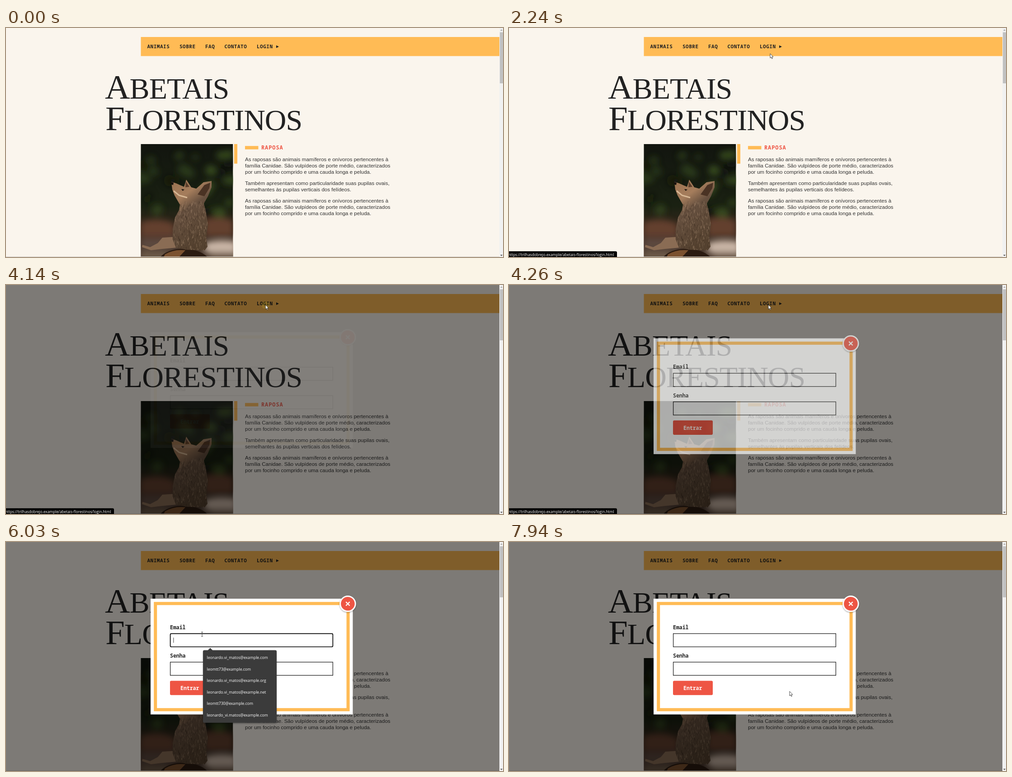
Animation of 1100 by 509 pixels, one loop 8 s. Source, as an HTML page:

```html
<!DOCTYPE html>
<html lang="pt">
<head>
<meta charset="utf-8">
<title>Abetais Florestinos</title>
<style>
html, body { margin: 0; width: 100%; height: 100%; overflow: hidden; background: #faf5ed; }
svg { display: block; width: 100vw; height: 100vh; }
text { white-space: pre; }
.title { font: 66px "Liberation Serif", serif; letter-spacing: -1px; fill: #222; }
.title .cap { font-size: 77px; }
.mono { font: 600 11.5px "Noto Sans Mono", monospace; fill: #222; }
.nav { font-size: 11px; letter-spacing: .52px; }
.body { font: 11.55px "Liberation Sans", sans-serif; fill: #333; }
.ui { font: 8.6px "Open Sans", sans-serif; fill: #fff; }
.field { fill: #fff; stroke: #222; stroke-width: 1.3; }
.arrow, .hand { fill: #fff; stroke: #222; stroke-width: .8; stroke-linejoin: round; }
</style>
</head>
<body>
<svg viewBox="0 0 1100 509">
  <defs>
    <clipPath id="photoClip"><rect x="298.5" y="258" width="203.7" height="251"/></clipPath>
    <clipPath id="foxClip"><use href="#foxBody"/></clipPath>
    <filter id="soft" x="-50%" y="-50%" width="200%" height="200%"><feGaussianBlur stdDeviation="7"/></filter>
    <filter id="shadow" x="-30%" y="-30%" width="160%" height="160%">
      <feDropShadow dx="0" dy="1.5" stdDeviation="1.5" flood-opacity=".35"/>
    </filter>
    <linearGradient id="woods" x2="0" y2="1">
      <stop offset="0" stop-color="#12150f"/><stop offset=".55" stop-color="#1a2112"/>
      <stop offset=".72" stop-color="#33271c"/><stop offset="1" stop-color="#4d3b30"/>
    </linearGradient>
    <linearGradient id="fur" x2=".4" y2="1">
      <stop offset="0" stop-color="#9a7150"/><stop offset=".3" stop-color="#a57d5c"/>
      <stop offset=".5" stop-color="#66503f"/><stop offset="1" stop-color="#54412f"/>
    </linearGradient>
  </defs>

  <rect width="1100" height="509" fill="#faf5ed"/>
  <rect x="298.5" y="20" width="793.5" height="42.4" fill="#fb5"/>
  <g id="nav"></g>
  <path d="M598 38.6l6 2.9-6 2.9z" fill="#222"/>
  <text class="title" x="219" y="157"><tspan class="cap">A</tspan>BETAIS</text>
  <text class="title" x="220" y="227"><tspan class="cap">F</tspan>LORESTINOS</text>

  <g clip-path="url(#photoClip)">
    <rect x="298" y="258" width="205" height="251" fill="url(#woods)"/>
    <g filter="url(#soft)">
      <g id="leaves"></g>
      <path d="M298 432q40-14 75 4v28h-75zM440 425q30-8 62 2v36h-62z" fill="#63402d"/>
      <path d="M298 468h80v24h-80z" fill="#5d4a40"/>
      <path d="M440 478q30-10 70-3v24h-70z" fill="#c9b5a6"/>
      <path d="M298 498h60v14h-60zM452 500h60v12h-60z" fill="#75624f"/>
    </g>
    <path d="M340 511q14-18 46-20 40-2 62 20z" fill="#2b1b11"/>
    <path d="M352 503q20-12 45-9l-14 15h-34z" fill="#7b512f"/>
    <path d="M376 464L346 466 336 478 319 487 302 482 301 487 321 494 346 491 379 488z" fill="#8a6c54"/>
    <path id="foxBody" fill="url(#fur)" d="M366 342L376 345 394 353 399 337 410 354 421 357 437 343 455 340 455 354 447 374 438 390 443 411 447 438 443 465 446 486 440 494 400 493 376 488 369 470 369 447 374 421 383 405 385 393 373 372 368 359z"/>
    <g id="furStrokes" clip-path="url(#foxClip)"></g>
    <path d="M424 370L439 349 452 344 450 356 439 374z" fill="#4a3324"/>
    <path d="M398 341l8 12-9 1z" fill="#5a3d2a"/>
    <path d="M365 342l6 2-1 5-4-1zM388 358l7 1-4 3z" fill="#15100d"/>
    <path d="M371 362l12 10 18 5" fill="none" stroke="#d8b895" stroke-width="3"/>
  </g>

  <path d="M505 258h7v43.5h-7zM529 262.3h29.5v7.5H529z" fill="#fb5"/>
  <text class="mono" x="565" y="270" style="font-size:12px;letter-spacing:.9px;fill:#e54">RAPOSA</text>
  <g id="copy"></g>
  <rect y="508" width="1092" height="1" fill="#cfcac3"/>

  <g id="modal">
    <rect width="1092" height="509" opacity=".5"/>
    <g id="dialog">
      <rect x="320" y="126" width="447.5" height="257.3" fill="#fff"/>
      <rect x="330.7" y="136.7" width="426.4" height="236" fill="#fff" stroke="#fb5" stroke-width="7"/>
      <text class="mono" x="363" y="193.5">Email</text>
      <rect id="email" class="field" x="363.6" y="203.6" width="359.8" height="29.4"/>
      <text class="mono" x="363" y="257.2">Senha</text>
      <rect id="password" class="field" x="363.6" y="267" width="359.8" height="29.4"/>
      <rect x="363" y="308.5" width="88" height="31.8" rx="2.8" fill="#e54"/>
      <text class="mono" x="386" y="329" style="font-weight:700;fill:#fff">Entrar</text>
      <g filter="url(#shadow)"><circle cx="756.5" cy="137.3" r="18.2" fill="#fff"/></g>
      <circle cx="756.5" cy="137.3" r="15.3" fill="#e54"/>
      <path d="M752.3 133.1l8.4 8.4m0-8.4l-8.4 8.4" stroke="#fff" stroke-width="2.3"/>
    </g>
    <rect id="caret" x="370.4" width=".9" height="11.5" fill="#222"/>
    <g id="suggestions" filter="url(#shadow)">
      <path d="M446.5 241l5.5-5.5 5.5 5.5z" fill="#3b3b3b"/>
      <rect x="436" y="240.4" width="163" height="161.4" rx="3" fill="#3b3b3b"/>
    </g>
  </g>

  <g id="status">
    <path d="M0 496.3h236q3 0 3 3V509H0z"/>
    <text class="ui" x="-2" y="507" style="font-size:8.3px">https://trilhasdobrejo.example/abetais-florestinos/login.html</text>
  </g>

  <rect x="1092" width="8" height="509" fill="#f1f1f1"/>
  <rect x="1093" y="9.5" width="7" height="113.5" fill="#c1c1c1"/>
  <path d="M1094 6l2.5-3 2.5 3z" fill="#a3a3a3"/>
  <path d="M1094 504l2.5 3 2.5-3z" fill="#505050"/>

  <g id="cursor">
    <circle id="ring" cy="1" r="8.5" fill="#fe1" fill-opacity=".75"/>
    <path id="arrow" class="arrow" d="M0 0V9.8L2.2 7.8 3.8 11.3 5.4 10.6 3.9 7.1H6.8z"/>
    <path id="hand" class="hand" d="M-1.1 1Q0-.6 1.1 1V5L5 6Q6 6.5 6 8V11L4.5 14.6H-.5L-3.5 9.5Q-3.5 8-2.2 8.4L-1.1 9.5z"/>
    <path id="beam" d="M-2-5H-.6L0-4.5.6-5H2M-2 5H-.6L0 4.5.6 5H2M0-4.5V4.5" fill="none" stroke="#333" stroke-width=".9"/>
  </g>
</svg>
<script>
const LOOP = 8000;
const $ = id => document.getElementById(id);
const clamp = v => Math.max(0, Math.min(1, v));
const ramp = (t, from, to) => clamp((t - from) / (to - from));
const smooth = p => p * p * (3 - 2 * p);

function add(parent, tag, attrs, text = '') {
  const el = document.createElementNS('http://www.w3.org/2000/svg', tag);
  for (const name in attrs) el.setAttribute(name, attrs[name]);
  el.textContent = text;
  return parent.appendChild(el);
}

function seeded(seed) {
  return () => (seed = (seed * 16807) % 2147483647) / 2147483647;
}

const menu = { ANIMAIS: 312.5, SOBRE: 384, FAQ: 441, CONTATO: 483.5, LOGIN: 555 };
for (const label in menu) add($('nav'), 'text', { class: 'mono nav', x: menu[label], y: 45.3 }, label);

const intro = [
  'As raposas são animais mamíferos e onívoros pertencentes à',
  'família Canidae. São vulpídeos de porte médio, caracterizados',
  'por um focinho comprido e uma cauda longa e peluda.'
];
const detail = [
  'Também apresentam como particularidade suas pupilas ovais,',
  'semelhantes às pupilas verticais dos felídeos.'
];
[[296, intro], [349.3, detail], [388.3, intro]].forEach(([top, lines]) =>
  lines.forEach((line, i) => add($('copy'), 'text', { class: 'body', x: 529, y: top + i * 14 }, line)));

[
  'leonardo.vi_matos@example.com', 'leomtt73@example.com',
  'leonardo.vi_matos@example.org', 'leonardo.vi_matos@example.net',
  'leomtt730@example.com', 'leonardo_vi.matos@example.com'
].forEach((mail, i) => add($('suggestions'), 'text', { class: 'ui', x: 444.5, y: 260 + i * 25.55 }, mail));

const rand = seeded(41);
for (let i = 0; i < 34; i++) {
  const x = 300 + rand() * 205;
  add($('leaves'), 'circle', {
    cx: x, cy: 280 + rand() * 135, r: 5 + rand() * 9,
    fill: rand() < .4 ? '#10130d' : '#3c5121', opacity: x > 420 ? .8 : .45
  });
}
const furTones = ['#2f2219', '#4a382b', '#a88b70', '#c3a587'];
for (let i = 0; i < 420; i++) {
  const x = 366 + rand() * 84, y = 385 + rand() * 110;
  add($('furStrokes'), 'path', {
    d: `M${x} ${y}l${rand() * 4 - 2} ${3 + rand() * 5}`,
    stroke: furTones[Math.floor(rand() * 4)], 'stroke-width': .8, opacity: .5
  });
}

// time, x, y of the pointer
const path = [
  [70, 1091, 498], [860, 622, 118], [930, 622, 118], [1300, 575, 46],
  [1770, 575, 46], [2030, 574, 47], [2170, 574, 47], [2240, 578, 57],
  [3030, 578, 57], [3300, 574, 46], [3800, 575, 44], [4330, 574, 44],
  [4790, 623, 173], [4930, 623, 173], [5150, 641, 134], [5710, 434, 205],
  [6050, 434, 205], [6500, 405, 271], [7000, 405, 271], [7600, 621, 332], [LOOP, 621, 332]
];
const clicks = [[4010, 4150], [5820, 6020], [6600, 6860], [7680, 7840]];
const OPEN = 4135, EMAIL = 5850, PASSWORD = 6630, BLUR = 7720;

function pointerAt(t) {
  const next = Math.max(1, path.findIndex(key => key[0] > t));
  const [t0, x0, y0] = path[next - 1], [t1, x1, y1] = path[next];
  const p = smooth(ramp(t, t0, t1));
  return [x0 + (x1 - x0) * p, y0 + (y1 - y0) * p];
}

function pointerShape(x, y, open) {
  if (!open) return x > 550 && x < 608 && y > 28 && y < 54 ? 'hand' : 'arrow';
  const inField = x > 363 && x < 724 && (y > 203 && y < 233 || y > 266 && y < 297);
  return inField ? 'beam' : 'arrow';
}

const show = (id, visible) => $(id).setAttribute('visibility', visible ? 'inherit' : 'hidden');
const fade = (id, opacity) => $(id).setAttribute('opacity', opacity);

function focusField(id, focused) {
  $(id).setAttribute('rx', focused ? 2.5 : 0);
  $(id).style.stroke = focused ? '#000' : '';
  $(id).style.strokeWidth = focused ? 1.7 : '';
}

function render(t) {
  const open = t >= OPEN;
  const [x, y] = pointerAt(t);
  const shape = pointerShape(x, y, open);
  $('cursor').setAttribute('transform', `translate(${x} ${y})`);
  show('cursor', t >= 70);
  ['arrow', 'hand', 'beam'].forEach(id => show(id, id === shape));
  const click = clicks.find(([from, to]) => t >= from && t < to);
  fade('ring', click ? 1 - ramp(t, click[1] - 60, click[1]) : 0);

  const entry = 1 - (1 - ramp(t, OPEN, OPEN + 300)) ** 2;
  show('modal', open);
  fade('dialog', entry);
  $('dialog').setAttribute('transform', `translate(0 ${-22 * (1 - entry)})`);

  const inEmail = t >= EMAIL && t < PASSWORD;
  const inPassword = t >= PASSWORD && t < BLUR;
  focusField('email', inEmail);
  focusField('password', inPassword);
  const blinkOn = (t - (inEmail ? EMAIL : PASSWORD)) % 1000 < 500;
  show('caret', (inEmail || inPassword) && blinkOn);
  $('caret').setAttribute('y', inEmail ? 212.5 : 276);
  fade('suggestions', ramp(t, 5920, 5980) * (1 - ramp(t, 6680, 6830)));

  const firstHover = ramp(t, 1260, 1320) - ramp(t, 2380, 2500);
  const secondHover = ramp(t, 3140, 3200) - ramp(t, 4400, 4500);
  fade('status', firstHover + secondHover);
}

const start = performance.now();
function tick() {
  render((performance.now() - start) % LOOP);
  requestAnimationFrame(tick);
}
tick();
</script>
</body>
</html>
```
